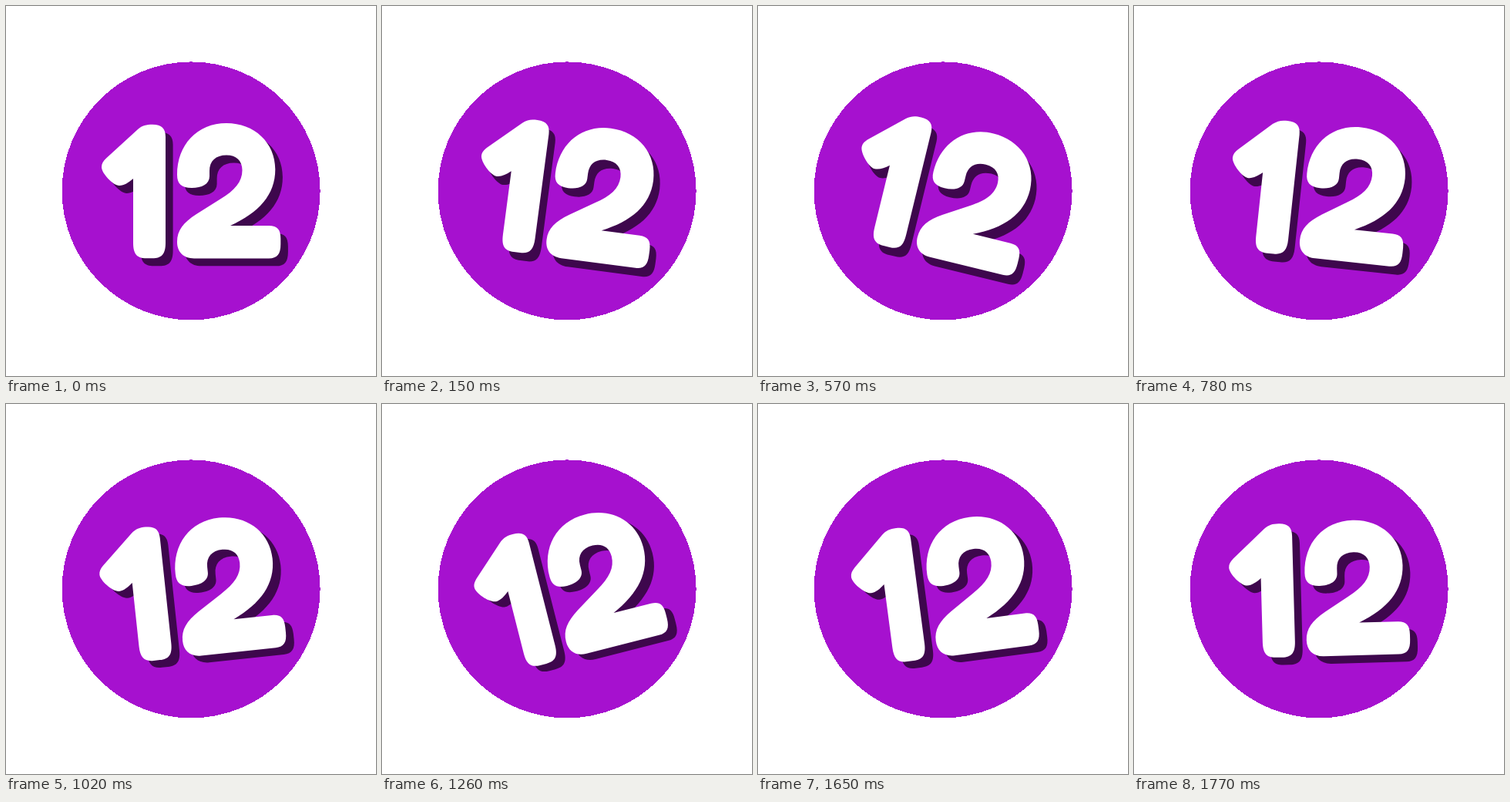
An HTML page for the animation above (1800 ms loop, 480x480 px).

```html
<!DOCTYPE html>
<html lang="en">
<head>
<meta charset="utf-8">
<title>Rocking twelve</title>
<style>
  html, body { margin: 0; width: 100%; height: 100%; overflow: hidden; background: #fff; }
  svg { display: block; width: 100vw; height: 100vh; }
</style>
</head>
<body>
<svg viewBox="0 0 480 480" role="img" aria-label="12">
  <defs>
    <g id="digits">
      <path d="M190 153.800C202 153.800 207 159 207 170V307C207 322 202 327.300 190 327.300H182C170 327.300 165 322 165 307V224
        C159 229 153 233 147 233C139 233 124 217 124 209C124 204.500 126 201.500 130 197.500L171 160C177 155 182 153.800 190 153.800Z"/>
      <path d="M286 152C322 152 349.300 177 349.300 212C349.300 245 328 268 291 285H341C352 285 356.300 290 356.300 302V309
        C356.300 322 352 327.400 341 327.400H244C230 327.400 222 319 222 306C222 291 230 281 247 270L278 250.500
        C297 239 306.500 228 306.500 213C306.500 201 299 193.500 286 193.500C272 193.500 264 201 264 214V221
        C264 231 254 236 241 236C228 236 222 231 222 219C222 180 248 152 286 152Z"/>
    </g>
  </defs>
  <circle cx="240.100" cy="239.900" r="167.500" fill="#a611cf" shape-rendering="crispEdges"/>
  <g id="number">
    <use href="#digits" x="9.600" y="9.900" fill="#3e074d"/>
    <use href="#digits" fill="#fff"/>
  </g>
</svg>
<script>
  const LOOP = 1800, STEP = 30, SWING = 15;
  const number = document.getElementById('number');

  function draw(ms) {
    const t = Math.floor((ms % LOOP) / STEP) * STEP;
    const angle = SWING * Math.sin(2 * Math.PI * t / LOOP);
    number.setAttribute('transform', `rotate(${angle} 240 240)`);
  }

  const start = performance.now();
  function tick() {
    draw(performance.now() - start);
    requestAnimationFrame(tick);
  }
  tick();
</script>
</body>
</html>
```
